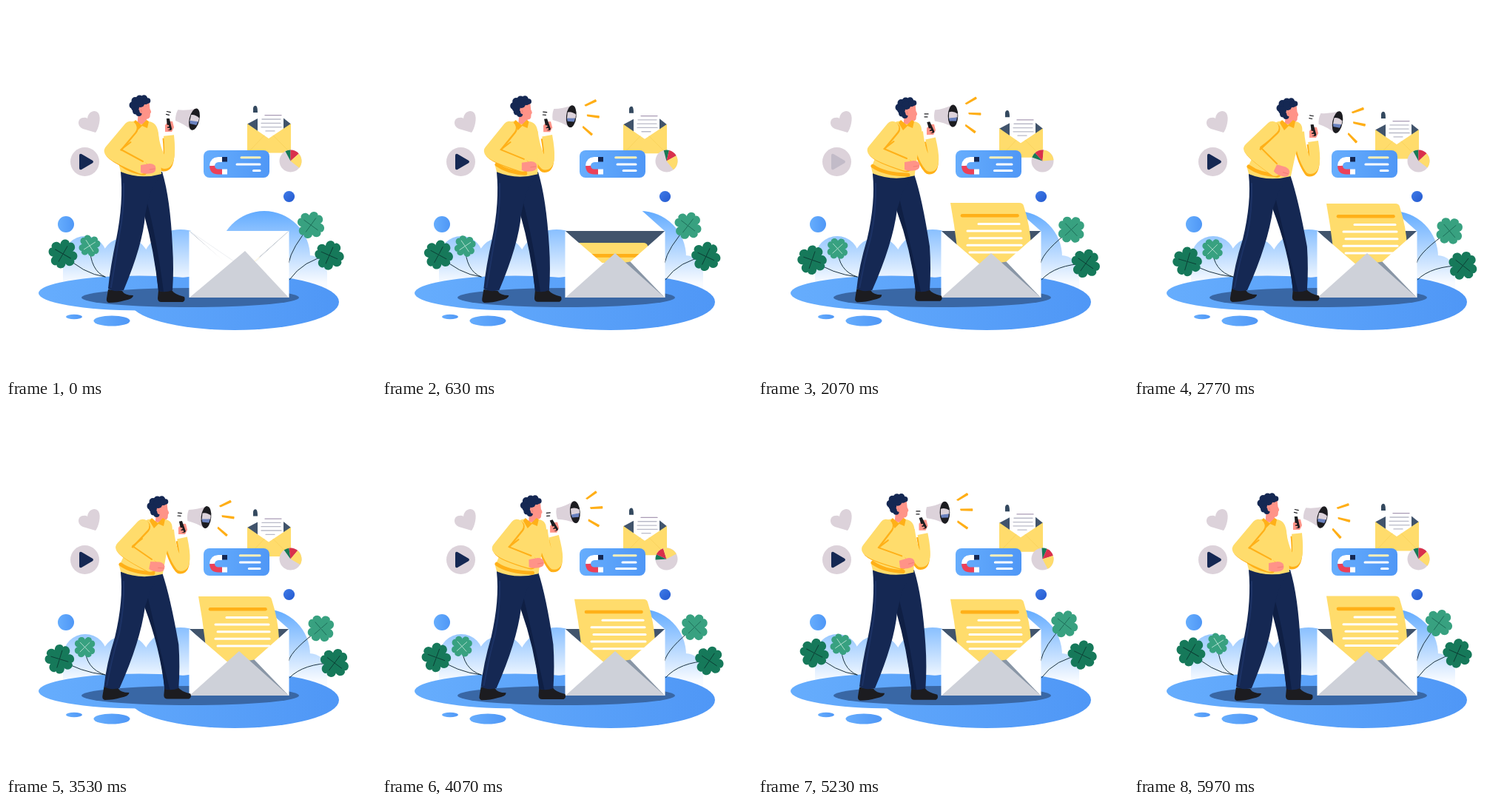
An HTML page with a canvas that plays this animation: 500x500 px, repeating every 6000 ms.

```html
<!DOCTYPE html>
<html lang="en">
<head>
<meta charset="utf-8">
<title>Email marketing</title>
<style>
html, body { margin: 0; width: 100%; height: 100%; overflow: hidden; background: #fff; }
canvas { display: block; width: 500px; height: 500px; }
</style>
</head>
<body>
<canvas id="stage" width="500" height="500"></canvas>
<script>
const c = document.getElementById('stage').getContext('2d');
const LOOP = 6000;
const NAVY = '#152853', LILAC = '#dcd2da', YELLOW = '#ffdc6c', ORANGE = '#ffb018',
  SKIN = '#ff9388', SLATE = '#41546c', BLACK = '#1c1c20', WHITE = '#fff';
const poseTimes = [0, 1130, 2070, 2770, 3530, 4570, 6000];
let now = 0;

// Smooth periodic curve through one value per pose time.
function pose(...v) {
  const n = v.length;
  let i = n - 1;
  while (poseTimes[i] > now) i--;
  const time = k => poseTimes[(k + n) % n] + LOOP * Math.floor(k / n);
  const value = k => v[(k + n) % n];
  const slope = k => (value(k + 1) - value(k - 1)) / (time(k + 1) - time(k - 1));
  const d = time(i + 1) - time(i), u = (now - time(i)) / d, w = 1 - u;
  return value(i) * w * w * (1 + 2 * u) + value(i + 1) * u * u * (3 - 2 * u)
    + slope(i) * d * u * w * w - slope(i + 1) * d * u * u * w;
}
const ramp = (a, b) => {
  const u = Math.min(1, Math.max(0, (now - a) / (b - a)));
  return u * u * (3 - 2 * u);
};
const swing = period => Math.sin(Math.PI * now / period) ** 2;

function fill(d, color) { c.fillStyle = color; c.fill(new Path2D(d)); }
function stroke(d, color, width, cap = 'round') {
  c.strokeStyle = color;
  c.lineWidth = width;
  c.lineCap = cap;
  c.lineJoin = 'round';
  c.stroke(new Path2D(d));
}
function oval(x, y, rx, ry, color, turn = 0) {
  c.fillStyle = color;
  c.beginPath();
  c.ellipse(x, y, rx, ry, turn * Math.PI / 180, 0, 7);
  c.fill();
}
const dot = (x, y, r, color) => oval(x, y, r, r, color);
function at(x, y, turn, draw) {
  c.save();
  c.translate(x, y);
  c.rotate(turn * Math.PI / 180);
  draw();
  c.restore();
}
function fade(x1, y1, x2, y2, from, to) {
  const g = c.createLinearGradient(x1, y1, x2, y2);
  g.addColorStop(0, from);
  g.addColorStop(1, to);
  return g;
}
const blue = (x1, x2) => fade(x1, 0, x2, 0, '#66adfd', '#4f97f6');

function scenery() {
  const sky = fade(0, 277, 0, 374, '#62abff', '#f8fbff');
  dot(107, 341, 30, sky);
  dot(161, 346, 33, sky);
  dot(236, 356, 54, sky);
  dot(349, 339, 62, sky);
  dot(410, 361, 24, sky);
  fill('M77 342H410V360H434V382H77Z', sky);

  const ground = blue(44, 450);
  oval(180, 388, 136, 23.5, ground);
  oval(309, 400, 141, 38, ground);
  oval(249, 394, 147, 13, '#3967a5');
  oval(92, 420, 11, 3.3, blue(81, 103));
  oval(143, 425.5, 24.5, 7, blue(118, 168));
  dot(81, 295, 11, blue(70, 92));
  dot(382.5, 257.5, 7.6, fade(375, 250, 390, 265, '#3f7be8', '#2459cf'));
}

function clover(x, y, r, turn, color, vein) {
  at(x, y, turn, () => {
    c.scale(r / 20, r / 20);
    for (let i = 0; i < 4; i++) {
      fill('M0 0C-6-4-12-9-10-15C-7.500-20.500-1-20 0-17C1-20 7.500-20.500 10-15C12-9 6-4 0 0Z', color);
      stroke('M0 0V-12', vein, .9);
      c.rotate(Math.PI / 2);
    }
  });
}
function plants(p) {
  const dark = '#16795a', light = '#38a180', ink = '#1c3340';
  const ax = 77 - 5 * p, ay = 335 + 10.5 * p, bx = 113 - 7 * p, by = 324 + 5 * p;
  const dx = 437 + 7.5 * p, dy = 337 + 14 * p, ex = 412 + 14.5 * p, ey = 296 + 8 * p;
  stroke(`M${ax} ${ay}Q${ax + 27} 362 134 366`, ink, 1);
  stroke(`M${bx} ${by}Q${bx + 1} 358 134 366`, ink, 1);
  stroke(`M${dx} ${dy}Q402 ${343 + 8 * p} 383 370`, ink, 1);
  stroke(`M${ex} ${ey}Q386 ${326 + 6 * p} 382 347`, ink, 1);
  clover(ax, ay, 20, 30 - 14 * p, dark, '#0c3f35');
  clover(bx, by, 15, 57 - 12 * p, light, '#d9f2e8');
  clover(ex, ey, 19, 36 + 14 * p, light, '#1c6b57');
  clover(dx, dy, 20, 24 + 14 * p, dark, '#0c3f35');
}

function icons(p, q) {
  fill('M121 171L104 166C96 163 96 152 104 151Q108 150 110 152C111 142 121 139 125 145C129 151 125 166 121 171Z', LILAC);
  dot(106.5, 210.5, 19.5, LILAC);
  const blink = now > 1700 && now < 2440 ? Math.sin((now - 1700) / 740 * Math.PI) ** 2 : 0;
  c.globalAlpha = 1 - .87 * blink;
  fill('M99 202Q99 199 102 200L116.500 208.500Q119.500 210.500 116.500 212.500L102 221Q99 222 99 219Z', NAVY);
  c.globalAlpha = 1;

  at(0, 8 * p, 0, () => {
    fill('M326 159.500L341 151.500H375L385 159.500L355 184Z', SLATE);
    fill('M334 144V138Q335 134 338 135Q340 136 340 144Z', '#34495f');
    fill('M340 138Q340 134 343 134H372Q375 134 375 138V180H340Z', WHITE);
    const starts = [350, 346, 345, 345, 351], ends = [372, 371, 371, 372, 363];
    starts.forEach((x, i) =>
      stroke(`M${x} ${147.7 + 5.3 * i}H${ends[i]}`, i ? '#b9bac8' : '#a99bb5', 1.3));
    fill('M326 159L355 179L385 159V198.500H326Z', YELLOW);
    stroke('M327 198L349 175M384 198L361 175', '#f8cf58', .7);
  });

  c.fillStyle = blue(267, 356);
  c.beginPath();
  c.roundRect(267, 195, 89, 37, 8);
  c.fill();
  stroke('M292 207.500H287Q279 208 278.500 216', WHITE, 7, 'butt');
  stroke('M278.500 216Q279 224 287 224H292', '#ec4058', 7, 'butt');
  fill('M292 204H299V210.500H292Z', NAVY);
  fill('M292 220.500H299V227.500H292Z', WHITE);
  stroke(`M${318 - 6 * q} 204.800H343`, '#fff0b8', 3);
  stroke(`M${312 + 16 * q} 214H343`, WHITE, 3);
  stroke(`M${334.500 - 22 * q} 222.500H343`, WHITE, 3);

  const h = now % 3000 / 3000;
  const ease = h < .5 ? 4 * h ** 3 : 1 - 4 * (1 - h) ** 3;
  at(384.500, 209.500, 360 * (now < 3000 ? ease : 1 - ease), () => {
    dot(0, 0, 15, LILAC);
    [[-118, -90, '#167a56'], [-90, -42, '#d9304c'], [-42, 38, YELLOW]].forEach(([a, b, color]) => {
      c.fillStyle = color;
      c.beginPath();
      c.moveTo(0, 0);
      c.arc(0, 0, 15, a * Math.PI / 180, b * Math.PI / 180);
      c.fill();
    });
  });
}

function letter() {
  const y = pose(259.5, 264, 266, 267, 260, 267) + 80 * (1 - ramp(400, 1080));
  c.save();
  c.beginPath();
  c.rect(240, 200, 150, 190);
  c.clip();
  at(0, y - 264, 0, () => {
    fill('M260 264H353Q358 264 359 268Q368 296 369 322V375H273Q271 325 260 264Z', YELLOW);
    stroke('M276 281.300H350.500', ORANGE, 4.6);
    [[298, 353], [283, 355], [286, 356], [283, 356], [286, 356]].forEach(([a, b], i) =>
      stroke(`M${a} ${292.5 + 9.6 * i}H${b}`, WHITE, 3));
  });
  c.restore();
}
function bigEnvelope() {
  const open = ramp(80, 560), apex = 304 + 57 * (1 - 2 * open);
  const flap = () => fill(`M248 304H382L318 ${apex}Q315 ${apex - 1} 312 ${apex}Z`, WHITE);
  if (open > .5) flap();
  fill('M248 304H382L337 350H295Z', SLATE);
  letter();
  if (open <= .5) flap();
  fill('M247.500 304L302 351V394H247.500Z', WHITE);
  fill('M382.500 304L335 346L330 394H382.500Z', WHITE);
  if (open <= .5) stroke('M248 304L308 345M382 304L338 345', '#e6e8ec', .7);
  c.globalAlpha = open;
  fill('M320 348L335.500 345.500L382 394Z', '#8996a6');
  c.globalAlpha = 1;
  const tip = 323 - 8 * open;
  fill(`M248 394L${tip} ${331 + 3 * open}L382 394Z`, '#ced1d9');
}

function legs(p) {
  const l = 136 - 6 * p, r = 205 + 9 * p, w = 224 + 4 * p, crotch = 283 - 10 * p;
  at(l - 136, -p, 0, () =>
    fill('M138 383L157 385Q160 391 172 391Q172 396 160 398Q151 401 139 401Q135 400 136 395Z', BLACK));
  at(r - 205, -1.5 * p, 0, () =>
    fill('M206 384H224Q228 390 241 393Q243 398 239 400H210Q205 400 205 395Z', BLACK));
  fill(`M185 ${w}H211Q222 260 ${r + 20} 325Q${r + 22} 355 ${r + 20} 384Q${r + 10} 388 ${r + 1} 385Q${r - 4} 330 188 ${crotch}Z`, NAVY);
  fill(`M190 ${crotch - 20}Q203 310 ${r + 8} 386L${r + 1} 385Q${r - 5} 330 187 ${crotch}Z`, '#0f1f44');
  fill(`M155 ${w - 2}L211 ${w}L196 250Q191 265 188 ${crotch}Q${185 - 4 * p} 322 ${l + 23} 384Q${l + 10} 387 ${l + 2} 382`
    + `Q${l + 5} 352 ${149 - 2 * p} 315Q159 265 155 ${w}Z`, NAVY);
  stroke(`M159 240Q160 275 153 310Q${l + 12} 345 ${l + 6} 380`, '#1c3265', 2);
}

function head(x, y) {
  at(x, y, 0, () => {
    fill('M12 27L24 28L23 38Q18 46 11 39Z', SKIN);
    fill('M11 13L27 9L28 19Q31 24 28.500 25L28 30Q26 34 21 32Q14 31 12 25Z', SKIN);
    [[5, 14, 5], [8, 8, 5], [14, 5.5, 5], [20, 5, 4.7], [25, 8, 3.8], [15, 11, 6], [22, 9, 4],
      [8, 17, 5.5], [9, 22, 4.5], [13, 25, 4]].forEach(([a, b, r]) => dot(a, b, r, NAVY));
    oval(16.5, 21, 2.7, 4, SKIN);
    stroke('M16 20L17 23', '#e9766f', .7);
  });
}

function megaphone(x, y, turn) {
  at(x, y, turn, () => {
    stroke('M-38-2H-33M-38 2H-34', BLACK, 1.2);
    fill('M-24-7.500Q-12-9 0-15V15Q-12 9-24 7.500Q-26 0-24-7.500Z', LILAC);
    oval(.5, 0, 6.8, 15, BLACK);
    fill('M-5-5Q1-7 6.500-3V2L-5 4Z', LILAC);
    fill('M-5 3L6 2L5 7H-4Z', '#6a82bf');
    const s = ramp(350, 620);
    if (!s) return;
    [[17, -16, 32, -25], [21, -3.5, 38, -3], [17, 12, 31, 22]].forEach(([a, b, d, e]) =>
      at(a, b, Math.atan2(e - b, d - a) * 180 / Math.PI, () =>
        fill(`M0-1Q0-1.500 1-1.500L${17 * s}-2Q${18 * s} 0 ${17 * s} 1.500L1 1.200Z`, '#ffae16')));
  });
}

function man(p) {
  const n = pose(0, 12, 18, 25, 22, 15);
  const hx = 192 + pose(0, 14, 16, 8, 12, 18), hy = 220 + pose(0, -6, -4, 3, 0, -8);
  const ex = 141.5 + pose(0, 11, 15, 15.5, 15.5, 15), ey = 196 + pose(0, 0, -1, -3, -2, 0);
  const rx = 217 + pose(0, 13, 18, 24, 22, 14), ry = 213 + pose(0, 3, 4, 7, 6, 2);
  const gx = 220 + pose(0, 7, 13, 22, 18, 7), gy = 162 + pose(0, 1, 4, 8, 6, 2);
  const turn = pose(13, -1, 1, 11, 6, -11), w = 228 + 3 * p;

  legs(p);

  const arm = (dx, dy) =>
    `M${198 + n + dx} ${170 + dy}Q${203 + n * .9 + dx} ${202 + dy} ${rx + dx - 3} ${ry + dy}Q${rx + dx + 7} ${ry + dy} ${gx + dx} ${gy + 13 + dy}`;
  stroke(arm(-1, 3), ORANGE, 15, 'butt');
  stroke(arm(0, 0), YELLOW, 14, 'butt');

  head(166.5 + pose(0, 14, 19, 26, 24, 16), 120 + pose(0, 2, 3, 4, 4, 2));

  fill(`M${175 + n} 155Q${163 + n} 156 ${158 + n * .9} 168L${156 + n * .3} 198L153 ${w - 12}L155 ${w - 4}`
    + `Q182 ${w + 7} ${210 + 2 * p} ${w - 1}L${209 + n * .35} 203L${206 + n * .85} 172Q${204 + n} 157 ${193 + n} 156Q${183 + n} 164 ${175 + n} 155Z`, YELLOW);
  fill(`M${175 + n} 154L${172 + n} 158L${178 + n} 168L${184 + n} 162L${191 + n} 165L${193 + n} 156L${190 + n} 154L${183 + n} 161Z`, ORANGE);
  stroke(`M155 ${w - 14}Q170 ${w - 3} ${hx - 5} ${w - 2}`, ORANGE, 5);

  const sleeve = (dx, dy) =>
    `M${168 + n * .76 + dx} ${164.5 + dy}L${ex + dx} ${ey + dy}Q${ex + 3 + dx} ${ey + 6 + dy} ${hx - 9 + dx} ${hy - 2 + dy}`;
  stroke(sleeve(1.5, 1.5), ORANGE, 18);
  stroke(sleeve(0, 0), YELLOW, 17.5);
  stroke(`M${ex + 27} ${ey - 12}L${ex + 14} ${ey - 2}L${hx - 7} ${hy - 10}`, ORANGE, 2);

  at(hx, hy, pose(0, 0, 0, 25, 12, -10), () => {
    fill('M-10-5L2-7Q8-7 10-3Q12 4 5 6Q-5 8-10 5Z', SKIN);
    stroke('M2 1L9 0', '#ee7a72', .8);
  });

  megaphone(254 + pose(0, 3, 9, 20.5, 16, -1), 153 + pose(0, -7.5, -4.5, 4, 0, -11), turn);
  fill(`M${gx - 5} ${gy - 1}Q${gx} ${gy - 7} ${gx + 5} ${gy - 6}L${gx + 7} ${gy + 2}L${gx + 4} ${gy + 8}H${gx - 5}Z`, SKIN);
  at(gx + 1, gy - 2, turn - 14, () => {
    fill('M-4-8H0L3 6Q3 8 1 8H-1Q-3 8-3 6Z', BLACK);
    stroke('M-5 2H-2M-4 6H-1', SKIN, 2.5);
  });
}

function frame(t) {
  now = t % LOOP;
  const p = swing(LOOP), q = swing(LOOP / 2);
  c.fillStyle = WHITE;
  c.fillRect(0, 0, 500, 500);
  scenery();
  plants(p);
  icons(p, q);
  bigEnvelope();
  man(p);
}

const start = performance.now();
function tick() {
  frame(performance.now() - start);
  requestAnimationFrame(tick);
}
tick();
</script>
</body>
</html>
```
